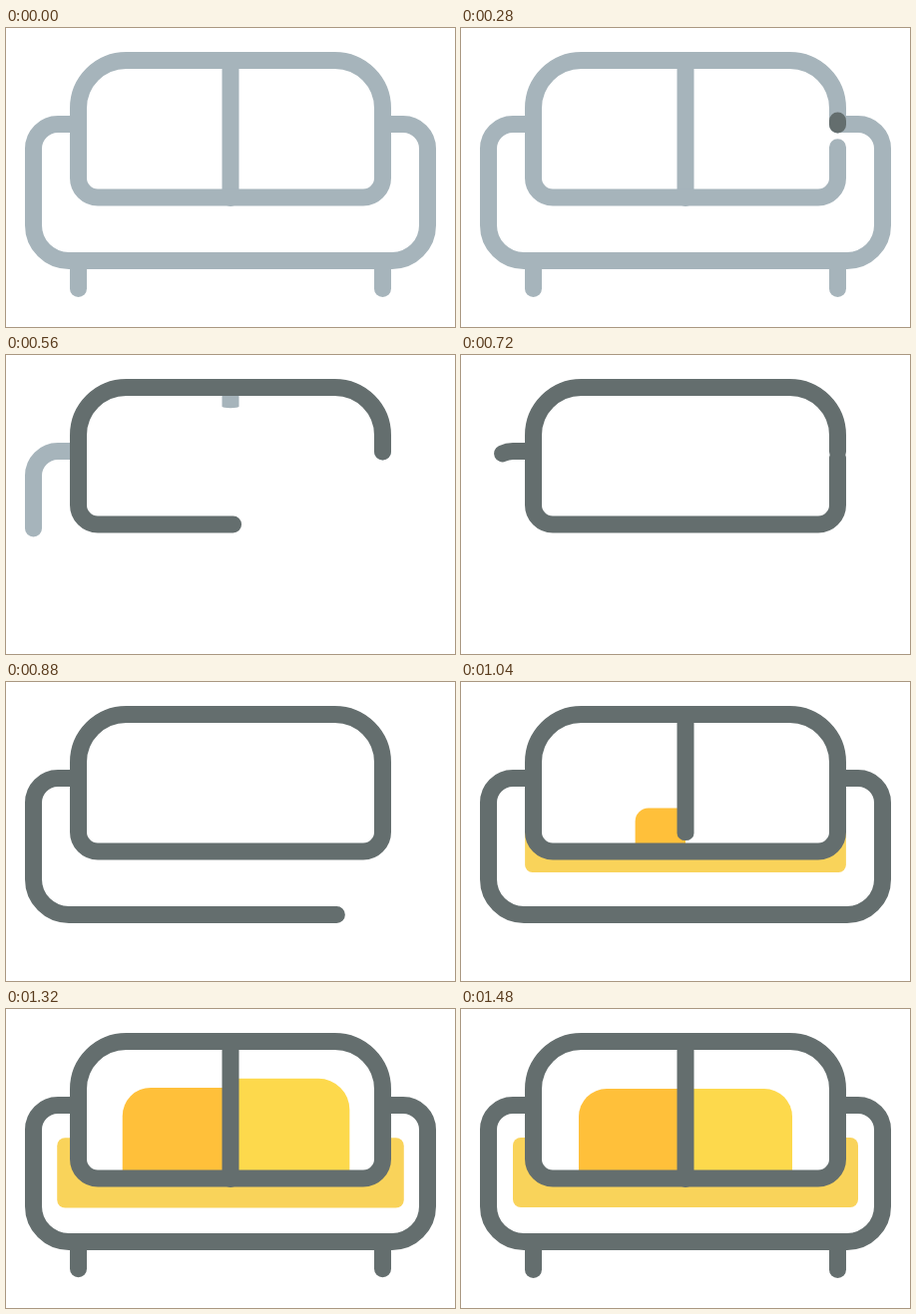
These frames come from a looping animation (450 by 300 pixels, 2.32 s). An HTML page:

```html
<!DOCTYPE html>
<html lang="en">
<head>
<meta charset="utf-8">
<title>Sofa</title>
<style>
  html, body { margin: 0; width: 100%; height: 100%; overflow: hidden; background: #fff; }
  svg { display: block; width: 100vw; height: 100vh; }
  .line { fill: none; stroke-width: 17; stroke-linecap: round; }
  .old { stroke: #a6b4bb; }
  .new { stroke: #646e6e; }
  rect.old { fill: #a6b4bb; stroke: none; }
  rect.new { fill: #646e6e; stroke: none; }
</style>
</head>
<body>
<svg viewBox="0 0 450 300">
  <defs>
    <path id="back" pathLength="1" d="M377.5 97V80.5A48 48 0 0 0 329.5 32.5H120.5A48 48 0 0 0 72.5 80.5V150.5A19.5 19.5 0 0 0 92 170H358A19.5 19.5 0 0 0 377.5 150.5Z"/>
    <path id="body" pathLength="1" d="M72.5 96.5H52A24.5 24.5 0 0 0 27.5 121V198A35.5 35.5 0 0 0 63 233.5H387A35.5 35.5 0 0 0 422.5 198V121A24.5 24.5 0 0 0 398 96.5H377.5"/>
    <g id="legs">
      <path pathLength="1" d="M72.5 233.5V261.5"/>
      <path pathLength="1" d="M377.5 233.5V261.5"/>
    </g>
    <rect id="post" x="216.5" y="24" width="17" height="155" rx="8.5"/>
  </defs>

  <rect id="seat" x="52" y="129" width="346" height="70" rx="8" fill="#f9d35a"/>
  <use id="oldLegs" href="#legs" class="line old"/>
  <use id="oldBody" href="#body" class="line old"/>
  <use id="newLegs" href="#legs" class="line new"/>
  <use id="newBody" href="#body" class="line new"/>
  <use href="#back" fill="#fff"/>
  <path id="left" d="M225 168H118V108A28 28 0 0 1 146 80H225Z" fill="#ffc03a"/>
  <path id="right" d="M225 168H332V108A28 28 0 0 0 304 80H225Z" fill="#fdd94c"/>
  <use id="oldPost" href="#post" fill="#a6b4bb"/>
  <use id="newPost" href="#post" fill="#646e6e"/>
  <use id="oldBack" href="#back" class="line old"/>
  <use id="newBack" href="#back" class="line new"/>
</svg>
<script>
const LOOP = 2320, STEP = 40;
const $ = id => document.getElementById(id);

const progress = (t, start, length) => Math.min(1, Math.max(0, (t - start) / length));
const inOut = p => p < 0.5 ? 4 * p ** 3 : 1 - 4 * (1 - p) ** 3;
const outBack = p => 1 + 2.85 * (p - 1) ** 3 + 1.85 * (p - 1) ** 2;
const ease = (...span) => inOut(progress(...span));
const pop = (...span) => outBack(progress(...span));

function show(id, visible) {
  $(id).style.display = visible ? '' : 'none';
}

// Shows the first part of an outline
function trace(id, part) {
  show(id, part > 0);
  $(id).style.strokeDasharray = `${part} 2`;
}

function scale(id, x, y, sx, sy = sx) {
  show(id, sy > 0);
  $(id).setAttribute('transform', `translate(${x} ${y}) scale(${sx} ${sy}) translate(${-x} ${-y})`);
}

function draw(t) {
  trace('oldBack', 1 - ease(t, 200, 420));
  trace('oldBody', 1 - ease(t, 229, 502));
  trace('oldLegs', 1 - ease(t, 335, 200));
  scale('oldPost', 225, 24, 1, 1 - ease(t, 327, 365));

  trace('newBack', ease(t, 219, 570));
  trace('newBody', ease(t, 613, 480));
  trace('newLegs', ease(t, 1168, 185));
  scale('newPost', 225, 24, 1, ease(t, 791, 365));

  scale('seat', 225, 85, t < 965 ? 0 : 0.772 + 0.228 * pop(t, 965, 400));
  scale('left', 225, 168, pop(t, 1000, 350));
  scale('right', 225, 168, pop(t, 1121, 350));
}

const began = performance.now();
function tick() {
  const t = (performance.now() - began) % LOOP;
  draw(Math.floor(t / STEP) * STEP);
  requestAnimationFrame(tick);
}
tick();
</script>
</body>
</html>
```
